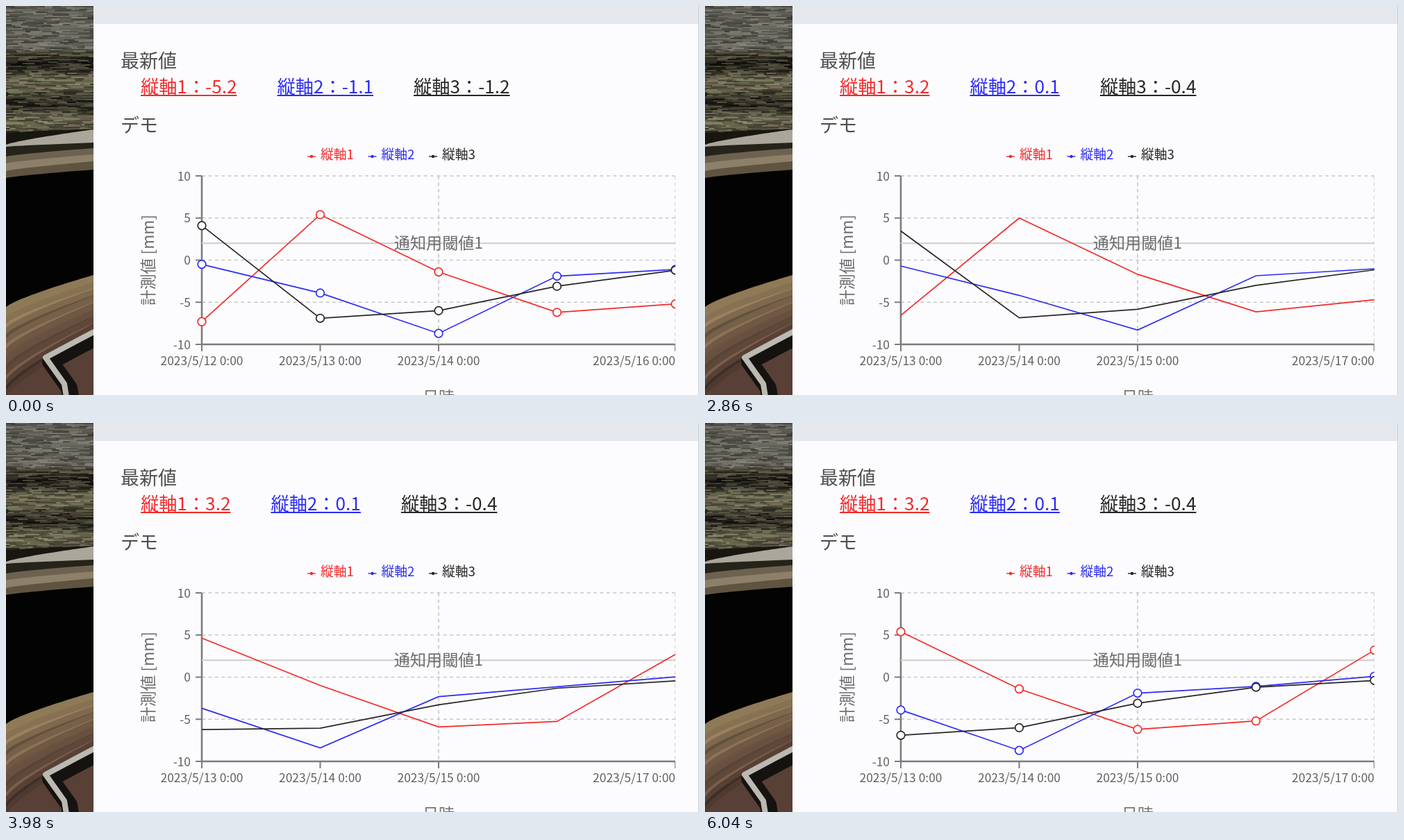
These frames come from a looping animation (998x561 px, 6060 ms). An HTML page with a canvas:

```html
<!DOCTYPE html>
<html lang="ja">
<head>
<meta charset="utf-8">
<title>計測値</title>
<style>
html, body { margin: 0; width: 100%; height: 100%; overflow: hidden; background: #fcfcfe; }
canvas { display: block; width: 998px; height: 561px; }
</style>
</head>
<body>
<canvas id="stage" width="998" height="561"></canvas>
<script>
const W = 998, H = 561, LOOP = 6060, START = 2728, SPAN = 1800;
const LEFT = 282, RIGHT = 964, TOP = 245, BOTTOM = 488, PHOTO = 126;
const FONT = '"Noto Sans CJK JP", "Noto Sans CJK", "Noto Sans", sans-serif';
const TICKS = [0, 1, 2, 4];
const SERIES = [
  { name: '縦軸1', color: '#f32a2a', data: [-7.3, 5.4, -1.4, -6.2, -5.2, 3.2] },
  { name: '縦軸2', color: '#2c2cf3', data: [-0.5, -3.9, -8.7, -1.9, -1.1, 0.1] },
  { name: '縦軸3', color: '#262626', data: [4.1, -6.9, -6.0, -3.1, -1.2, -0.4] }
];

const ctx = document.getElementById('stage').getContext('2d');
const xAt = i => LEFT + i * (RIGHT - LEFT) / 4;
const yAt = v => (TOP + BOTTOM) / 2 - v * (BOTTOM - TOP) / 20;

function layer(draw) {
  const c = document.createElement('canvas');
  c.width = W;
  c.height = H;
  draw(c.getContext('2d'));
  return c;
}

function text(g, str, x, y, size, color, align = 'left') {
  g.font = `${size}px ${FONT}`;
  g.fillStyle = color;
  g.textAlign = align;
  g.fillText(str, x, y);
}

function line(g, color, width, ...p) {
  g.strokeStyle = color;
  g.lineWidth = width;
  g.beginPath();
  for (let i = 0; i < p.length; i += 2) g.lineTo(p[i], p[i + 1]);
  g.stroke();
}

function disc(g, x, y, r, color) {
  g.fillStyle = color;
  g.beginPath();
  g.arc(x, y, r, 0, 2 * Math.PI);
  g.fill();
}

function clip(g, w, draw) {
  g.save();
  g.beginPath();
  g.rect(0, 0, w, H);
  g.clip();
  draw();
  g.restore();
}

// cubic-bezier(.25, .1, .25, 1)
function ease(t) {
  if (t <= 0) return 0;
  if (t >= 1) return 1;
  const bez = (s, a, b) => 3 * (1 - s) * (1 - s) * s * a + 3 * (1 - s) * s * s * b + s * s * s;
  let lo = 0, hi = 1;
  for (let i = 0; i < 30; i++) {
    const mid = (lo + hi) / 2;
    if (bez(mid, 0.25, 0.25) < t) lo = mid; else hi = mid;
  }
  return bez(lo, 0.1, 1);
}

// Fills everything below an edge that climbs to the right.
function ridge(g, y, rise, color) {
  g.fillStyle = color;
  g.beginPath();
  g.moveTo(PHOTO, H);
  g.lineTo(0, H);
  for (let x = 0; x <= PHOTO; x += 6) g.lineTo(x, y - rise * (x / PHOTO) ** 0.8);
  g.fill();
}

function drawTerrain(g) {
  let seed = 11;
  const rnd = () => (seed = (seed * 16807) % 2147483647) / 2147483647;

  g.fillStyle = '#46443d';
  g.fillRect(0, 0, PHOTO, H);
  for (let y = 0; y < 184; y += 2) {
    const mid = y < 64 ? 36 : 26 + 10 * Math.sin((y - 96) / 9);
    for (let x = -20 * rnd(); x < PHOTO;) {
      const w = 4 + rnd() * 20;
      g.fillStyle = `hsl(${35 + rnd() * 35} ${y < 64 ? 5 : 14}% ${mid + (rnd() - 0.5) * 26}%)`;
      g.fillRect(x, y, w, 2.5);
      x += w;
    }
  }

  ridge(g, 183, 6, '#17170f');
  ridge(g, 200, 22, '#aaa69c');
  ridge(g, 203, 6, '#25231a');
  ridge(g, 217, 12, '#6d6250');
  ridge(g, 227, 13, '#8d8068');
  ridge(g, 238, 14, '#5f5440');
  ridge(g, 248, 12, '#030303');

  for (let i = 0; i < 9; i++) {
    const y = 434 + i * 15, rise = 46 + i * 5, light = 45 - i * 2.5;
    const hue = 38 - i * 2.6;
    ridge(g, y, rise, `hsl(${hue} 24% ${light}%)`);
    ridge(g, y + 9, rise, `hsl(${hue} 24% ${light + 9 * Math.sin(i * 2.4)}%)`);
  }

  const bank = [134, 466, 100, 484, 57, 507, 84, 545, 88, 570];
  g.lineJoin = 'round';
  line(g, '#15130f', 24, ...bank.map((v, i) => v + (i % 2 ? 6 : 7)));
  line(g, '#bbb9b2', 8, ...bank);
  g.lineJoin = 'miter';
}

function drawAxes(g) {
  g.setLineDash([5, 4.4]);
  for (let v = -5; v <= 10; v += 5) line(g, '#c8c8c8', 1.7, LEFT, yAt(v), RIGHT, yAt(v));
  for (const x of [xAt(2), RIGHT]) line(g, '#c8c8c8', 1.7, x, TOP, x, BOTTOM);
  g.setLineDash([]);

  line(g, '#7c7c7c', 2.6, LEFT, TOP, LEFT, BOTTOM, RIGHT, BOTTOM);
  for (let v = -10; v <= 10; v += 5) {
    line(g, '#7c7c7c', 2, LEFT - 9, yAt(v), LEFT, yAt(v));
    text(g, String(v), 266, yAt(v) + 6.5, 17.4, '#606060', 'right');
  }
  for (const i of TICKS) line(g, '#7c7c7c', 2, xAt(i), BOTTOM, xAt(i), BOTTOM + 10);
}

function drawBase(g) {
  g.fillStyle = '#fcfcfe';
  g.fillRect(0, 0, W, H);
  g.fillStyle = '#e5e9ee';
  g.fillRect(PHOTO, 0, W - PHOTO, 26);
  g.fillStyle = '#c9ccd1';
  g.fillRect(W - 1, 0, 1, H);
  clip(g, PHOTO, () => drawTerrain(g));

  text(g, '最新値', 165, 88.5, 27, '#4e4e4e');
  text(g, 'デモ', 165, 181.5, 27, '#4e4e4e');

  SERIES.forEach((s, i) => {
    const x = 453 + i * 87.5;
    line(g, s.color, 1.4, x - 19, 217, x - 7, 217);
    disc(g, x - 13, 217, 2.2, s.color);
    text(g, s.name, x, 221, 18.8, s.color);
  });

  clip(g, RIGHT, () => drawAxes(g));

  text(g, '日時', xAt(2), 572, 23, '#747474', 'center');
  g.save();
  g.translate(212.5, 366.5);
  g.rotate(-Math.PI / 2);
  text(g, '計測値 [mm]', 0, 0, 22.8, '#6c6c6c', 'center');
  g.restore();
}

const base = layer(drawBase);

function drawValues(shift) {
  let x = 194;
  for (const s of SERIES) {
    const str = `${s.name}：${s.data[4 + shift].toFixed(1)}`;
    text(ctx, str, x, 126, 26.2, s.color);
    const w = ctx.measureText(str).width;
    ctx.fillRect(x, 128, w, 2);
    x += w + 58;
  }
}

function drawDates(shift) {
  for (const i of TICKS) {
    text(ctx, `2023/5/${12 + i + shift} 0:00`, xAt(i), 517.5, 17.4, '#606060', i === 4 ? 'right' : 'center');
  }
}

function drawLines(p, dots) {
  for (const { color, data } of SERIES) {
    const pts = data.slice(0, 5).map((v, i) => [xAt(i), yAt(v + (data[i + 1] - v) * p)]);
    line(ctx, color, 1.7, ...pts.flat());
    if (!dots) continue;
    for (const [x, y] of pts) {
      disc(ctx, x, y, 5.8, '#fff');
      ctx.stroke();
    }
  }
}

function frame(now) {
  const k = (now % LOOP - START) / SPAN;
  const shift = k >= 0 ? 1 : 0;
  ctx.drawImage(base, 0, 0);
  drawValues(shift);
  drawDates(shift);
  line(ctx, '#d2d2d2', 2.2, LEFT, yAt(2), RIGHT, yAt(2));
  clip(ctx, RIGHT, () => drawLines(ease(k), k < 0 || k >= 1));
  text(ctx, '通知用閾値1', xAt(2), 349.5, 23.1, '#6c6c6c', 'center');
  requestAnimationFrame(frame);
}
requestAnimationFrame(frame);
</script>
</body>
</html>
```
